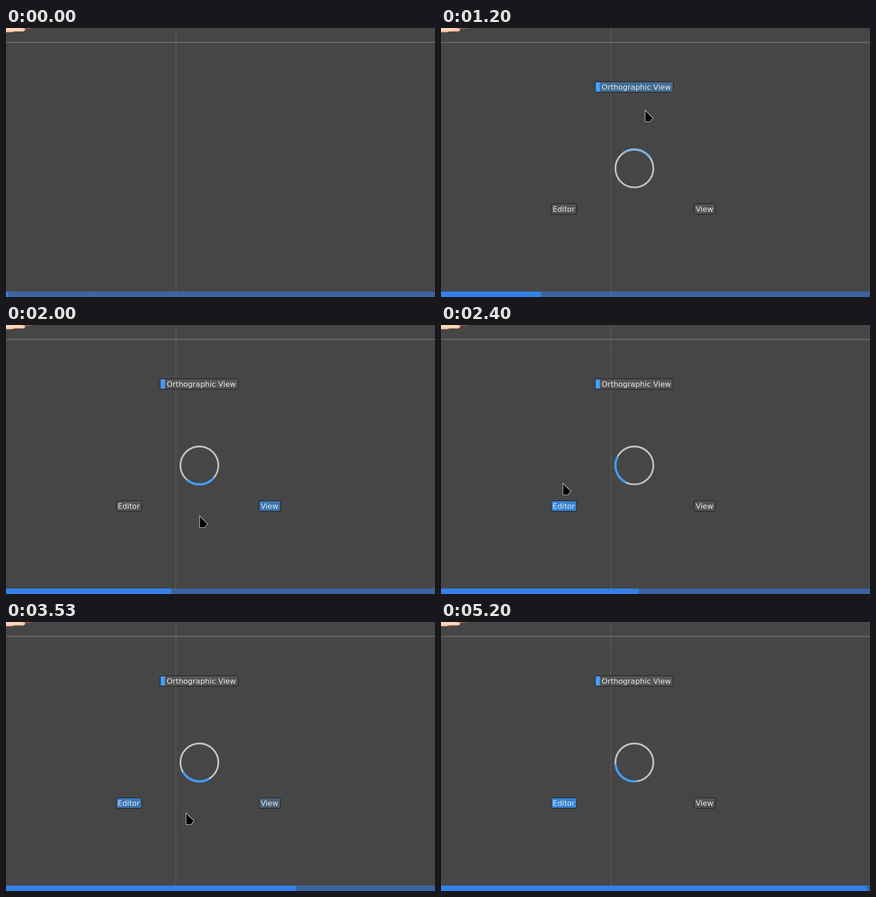
An HTML page with a canvas that plays this animation: 945x593 px, repeating every 5.27 s.

```html
<!DOCTYPE html>
<html lang="en">
<head>
<meta charset="utf-8">
<title>Pie menu</title>
<style>
html, body { margin: 0; width: 100%; height: 100%; overflow: hidden; background: #464646; }
canvas { display: block; }
</style>
</head>
<body>
<canvas id="stage" width="945" height="593"></canvas>
<script>
const ctx = document.getElementById('stage').getContext('2d');
const LOOP = 5270, STEP = 200 / 3, STEPS = 79;
const ARRIVE = 8, MENU_AT = 11, AIM_AT = 17, ORBIT_AT = 18;
const CX = 426, CY = 309.6;
const GREY = [84, 84, 84], BLUE = [52, 131, 212], RING = [196, 196, 196], ARC = [66, 157, 250];

// Turns around the menu: step, angle in degrees, radius
const orbit = [
  [18, -80, 132], [25, 225, 150], [30, 450, 110], [36, 526.5, 162.5],
  [39, 610, 110], [47, 756, 260], [51, 815, 150], [53, 825.3, 114],
  [61, 921, 120], [65, 1009.4, 72], [68.5, 1101, 240], [70, 1113, 470], [77, 1209, 374]
];

const items = [
  { text: 'Orthographic View', x: 339.5, y: 118.5, w: 172, tx: 354, mark: true },
  { text: 'View', x: 557.5, y: 387.5, w: 47, tx: 560.9 },
  { text: 'Editor', x: 242.8, y: 387.5, w: 56, tx: 246 }
];

const lerp = (a, b, k) => a + (b - a) * k;
const mix = (a, b, k) => `rgb(${a.map((v, i) => Math.round(lerp(v, b[i], k)))})`;

// Monotone cubic through column c of the orbit
function glide(n, c) {
  const last = orbit.length - 1;
  const i = Math.max(1, orbit.findIndex(p => p[0] >= n));
  const chord = j => (orbit[j][c] - orbit[j - 1][c]) / (orbit[j][0] - orbit[j - 1][0]);
  const slope = j => {
    const a = chord(Math.max(1, j)), b = chord(Math.min(last, j + 1));
    return a * b > 0 ? 2 * a * b / (a + b) : 0;
  };
  const a = orbit[i - 1], b = orbit[i], h = b[0] - a[0], k = (n - a[0]) / h;
  const ease = k * k * (3 - 2 * k);
  return lerp(a[c], b[c], ease)
    + h * k * (1 - k) * (slope(i - 1) * (1 - k) - slope(i) * k);
}

function pointer(n) {
  if (n < ARRIVE) {
    const k = n / ARRIVE;
    const curve = (a, b, c) => lerp(lerp(a, b, k), lerp(b, c, k), k);
    return [curve(185, 300, 424), curve(585, 330, 284)];
  }
  if (n < ORBIT_AT) {
    const k = ((n - ARRIVE) / (ORBIT_AT - ARRIVE)) ** 3;
    return [lerp(424, 449, k), lerp(284, 180, k)];
  }
  const t = Math.min(n, orbit.at(-1)[0]);
  const a = glide(t, 1) * Math.PI / 180, r = glide(t, 2);
  return [CX + r * Math.cos(a), CY + r * Math.sin(a)];
}

function aim(n, lag) {
  const [x, y] = pointer(n - lag);
  return Math.atan2(y - CY, x - CX);
}

// Each item fades in or out over four steps.
function levels(n) {
  const level = [0, 0, 0];
  for (let i = AIM_AT; i <= n; i++) {
    const turn = (aim(i, 0.4) * 180 / Math.PI + 510) % 360;
    const active = Math.floor(turn / 120);
    for (let j = 0; j < 3; j++)
      level[j] = Math.min(1, Math.max(0, level[j] + (j === active ? 0.25 : -0.25)));
  }
  return level;
}

function rect(color, x, y, w, h) {
  ctx.fillStyle = color;
  ctx.fillRect(x, y, w, h);
}

function polygon(points, fill, stroke, width = 1) {
  ctx.beginPath();
  points.forEach(([x, y]) => ctx.lineTo(x, y));
  ctx.closePath();
  ctx.fillStyle = fill;
  ctx.fill();
  if (stroke) {
    ctx.strokeStyle = stroke;
    ctx.lineWidth = width;
    ctx.stroke();
  }
}

function drawHand() {
  polygon([[-2, -2], [-2, 9], [13, 9], [19, 7.5], [38, 7.5], [42, 5], [42, 2], [34, -2]],
    '#ffceb2', '#d98e72');
  rect('#ffe2cf', 0, 2, 32, 2);
  polygon([[35, 0], [60, 0], [52, 1.4], [41, 1.6]], '#bd6650');
}

function drawItem({ text, x, y, w, tx, mark }, level) {
  ctx.beginPath();
  ctx.roundRect(x, y, w, 23, 3.5);
  ctx.fillStyle = mix(GREY, BLUE, level);
  ctx.fill();
  if (mark) rect('#429efc', x + 1, y + 1, 9.5, 21);
  ctx.strokeStyle = '#222';
  ctx.lineWidth = 1.5;
  ctx.stroke();
  ctx.fillStyle = '#e8e8e8';
  ctx.fillText(text, tx, y + 17.5);
}

// A stroke with a soft edge
function arc(color, width, from, to) {
  ctx.strokeStyle = color;
  ctx.beginPath();
  ctx.arc(CX, CY, 41.8, from, to);
  ctx.globalAlpha = 0.3;
  ctx.lineWidth = width + 1.5;
  ctx.stroke();
  ctx.globalAlpha = 1;
  ctx.lineWidth = width;
  ctx.stroke();
}

function drawRing(n) {
  arc(mix(RING, RING, 0), 3.4, 0, Math.PI * 2);
  if (n < AIM_AT) return;
  const a = aim(n, 0.2);
  arc(mix(RING, ARC, Math.min(1, (n - AIM_AT + 1) / 4)), 4.4, a - 0.8, a + 0.8);
}

function drawPointer(n) {
  const [x, y] = pointer(n).map(Math.round);
  polygon([[0.5, 1], [0.5, 26.5], [12, 26.5], [18, 18]].map(([dx, dy]) => [x + dx, y + dy]),
    '#000', '#d0d0d0', 1.2);
}

function draw(n) {
  rect('#464646', 0, 0, 945, 593);
  rect('#6a6a6a', 374, 0, 1, 593);
  rect('#7d7d7d', 0, 31, 945, 1.5);
  drawHand();
  if (n >= MENU_AT) {
    rect('#464646', 373, 48, 3, 533);
    rect('#5c5c5c', 373.5, 48, 1.5, 533);
    const level = levels(n);
    ctx.font = '16.45px "DejaVu Sans", sans-serif';
    items.forEach((item, i) => drawItem(item, level[i]));
    drawRing(n);
  }
  drawPointer(n);
  rect('rgba(57,111,190,.75)', 0, 581, 945, 12);
  rect('#3481e8', 0, 581, 4.8 + n * 11.96, 12);
}

const start = performance.now();
function tick() {
  const t = (performance.now() - start) % LOOP;
  draw(Math.min(STEPS - 1, Math.floor((t + 4) / STEP)));
  requestAnimationFrame(tick);
}
tick();
</script>
</body>
</html>
```
